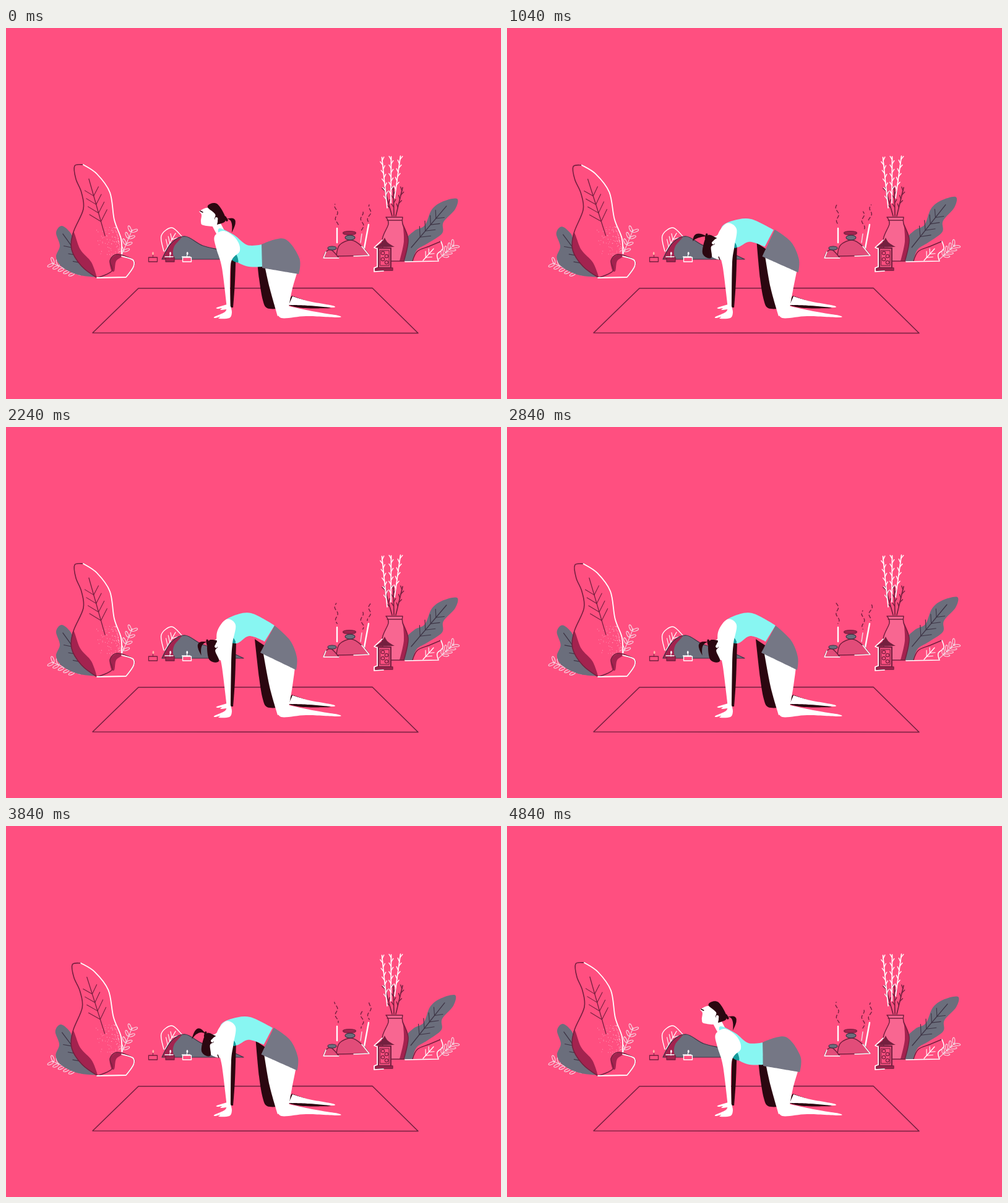
An HTML page with a canvas that plays this animation: 800x600 px, repeating every 4880 ms.

```html
<!DOCTYPE html>
<html lang="en">
<head>
<meta charset="utf-8">
<title>Cat and cow stretch</title>
<style>
html, body { margin: 0; width: 100%; height: 100%; overflow: hidden; background: #ff4f80; }
canvas { display: block; width: 800px; height: 600px; }
</style>
</head>
<body>
<canvas id="stage" width="800" height="600"></canvas>
<script>
const ctx = document.getElementById('stage').getContext('2d');
const LOOP = 4880, TAU = Math.PI * 2, RAD = Math.PI / 180;
const PINK = '#ff4f80', LIGHT = '#f86691', ROSE = '#e24c79', MAROON = '#a3234f', DARK = '#74203f',
  GREY = '#6b6e7c', SHORTS = '#757785', DEEP = '#3d3445', WHITE = '#ffffff', PALE = '#f4d5e0',
  CYAN = '#88f6f2', TEAL = '#159a9b', BLACK = '#2b0710';

const mix = (a, b, k) => a + (b - a) * k;
const clamp = (v, low, high) => Math.max(low, Math.min(high, v));

// Points are written "x,y"; a trailing "!" makes a sharp corner.
const pts = text => text.split(' ').map(word => {
  const [x, y] = word.split(',').map(parseFloat);
  return { x, y, hard: word.endsWith('!') };
});

function spline(source, closed) {
  const p = typeof source === 'string' ? pts(source) : source;
  const n = p.length, path = new Path2D();
  const at = i => closed ? p[(i + n) % n] : p[clamp(i, 0, n - 1)];
  path.moveTo(p[0].x, p[0].y);
  for (let i = 0; i < (closed ? n : n - 1); i++) {
    const a = at(i - 1), b = at(i), c = at(i + 1), d = at(i + 2);
    const u = b.hard ? 0 : 1 / 6, v = c.hard ? 0 : 1 / 6;
    path.bezierCurveTo(b.x + (c.x - a.x) * u, b.y + (c.y - a.y) * u,
      c.x - (d.x - b.x) * v, c.y - (d.y - b.y) * v, c.x, c.y);
  }
  return path;
}

function fill(source, color) {
  ctx.fillStyle = color;
  ctx.fill(spline(source, true));
}

function line(source, color, width = 1.5, closed = false) {
  ctx.strokeStyle = color;
  ctx.lineWidth = width;
  ctx.stroke(spline(source, closed));
}

function stroke(x0, y0, x1, y1, color, width = 1.3) {
  ctx.strokeStyle = color;
  ctx.lineWidth = width;
  ctx.beginPath();
  ctx.moveTo(x0, y0);
  ctx.lineTo(x1, y1);
  ctx.stroke();
}

function oval(x, y, rx, ry, color, edge, angle = 0) {
  ctx.beginPath();
  ctx.ellipse(x, y, rx, ry, angle, 0, TAU);
  if (color) { ctx.fillStyle = color; ctx.fill(); }
  if (edge) { ctx.strokeStyle = edge; ctx.lineWidth = 1.2; ctx.stroke(); }
}

function box(x, y, w, h, color, edge, width = 1.3) {
  ctx.fillStyle = color;
  ctx.fillRect(x, y, w, h);
  ctx.strokeStyle = edge;
  ctx.lineWidth = width;
  ctx.strokeRect(x, y, w, h);
}

function pivot(x, y, angle, paint) {
  ctx.save();
  ctx.translate(x, y);
  ctx.rotate(angle);
  ctx.translate(-x, -y);
  paint();
  ctx.restore();
}

// A rib with side veins that shorten towards the tip.
function veins(x0, y0, x1, y1, pairs, length, color) {
  stroke(x0, y0, x1, y1, color);
  const angle = Math.atan2(y1 - y0, x1 - x0);
  for (let i = 0; i < pairs; i++) {
    const k = .25 + .6 * i / pairs, x = mix(x0, x1, k), y = mix(y0, y1, k);
    for (const side of [-.75, .75]) {
      const reach = length * (1.15 - .5 * k);
      stroke(x, y, x + Math.cos(angle + side) * reach, y + Math.sin(angle + side) * reach, color, 1.1);
    }
  }
}

function sprig(x0, y0, x1, y1, pairs) {
  stroke(x0, y0, x1, y1, PALE, 1.1);
  const angle = Math.atan2(y1 - y0, x1 - x0);
  for (let i = 1; i <= pairs; i++) {
    const k = i / (pairs + .4), x = mix(x0, x1, k), y = mix(y0, y1, k);
    for (const a of [angle - .8, angle + .8]) {
      oval(x + Math.cos(a) * 6, y + Math.sin(a) * 6, 5, 1.9, null, PALE, a);
    }
  }
}

function branch(x0, y0, x1, y1, color) {
  stroke(x0, y0, x1, y1, color, 1.7);
  const angle = Math.atan2(y1 - y0, x1 - x0), twigs = Math.hypot(x1 - x0, y1 - y0) / 7;
  for (let i = 2; i < twigs; i++) {
    const k = i / twigs, a = angle + (i % 2 ? .55 : -.55);
    const x = mix(x0, x1, k), y = mix(y0, y1, k);
    stroke(x, y, x + Math.cos(a) * 6.5, y + Math.sin(a) * 6.5, color, 1.4);
  }
}

let seed = 11;
const random = () => (seed = seed * 16807 % 2147483647) / 2147483647;
const specks = Array.from({ length: 130 }, () => {
  const y = mix(322, 368, random());
  return { x: 177 + (y - 322) * .22 - 34 * random() ** 3, y };
});

function leftPlants(sway) {
  sprig(120, 400, 74, 380, 5);
  sprig(185, 372, 204, 326, 4);
  pivot(147, 403, -.02 * sway, () => {
    fill('81,331 90,320 104,331 113,350 147,403! 116,399 90,386 81,370 87,352', GREY);
    veins(138, 397, 92, 333, 3, 18, DEEP);
  });

  pivot(146, 352, -.032 * sway, () => {
    const leftEdge = '125,221 111,223 113,244 122,266 125,293 109,330 106,358 122,385 147,404!';
    const rightEdge = '125,221 147,236 168,266 175,310 186,341 187,366';
    fill(leftEdge + ' 184,402! ' + rightEdge.split(' ').reverse().join(' '), PINK);
    fill('109,330 106,358 122,385 147,404! 138,379 120,358', MAROON);
    line(leftEdge, DARK, 1.6);
    line(rightEdge, WHITE, 1.8);
    veins(160, 336, 134, 244, 4, 21, DARK);
    ctx.fillStyle = 'rgba(255,255,255,.5)';
    for (const { x, y } of specks) ctx.fillRect(x, y, .9, .9);
  });

  const front = '147,404! 171,393 168,376 180,366 205,375 206,386 194,403!';
  fill(front, PINK);
  fill('170,391 168,376 180,366 188,369 178,377 175,393', MAROON);
  line(front, DARK, 1.4);
  line('147,404! 194,403! 206,386 205,375 187,369', WHITE, 1.8);
}

function stonesAndCandles(t) {
  line('255,361 251,336 268,323 285,338', WHITE, 1.4);
  veins(257, 361, 274, 332, 3, 12, WHITE);
  const mound = '252,374! 268,347 290,337 318,352 354,361 384,374!';
  fill(mound, GREY);
  fill('252,374! 266,349 284,338 272,353 270,366 274,374!', MAROON);
  line(mound, DEEP, 1.2, true);
  for (let i = 0; i < 3; i++) {
    const x = 237.5 + 27.5 * i, edge = i ? WHITE : DARK;
    box(x - 7, 371, 14, 7, i === 1 ? MAROON : PINK, i === 1 ? DARK : edge);
    if (i) stroke(x - 8, 370, x + 5, 370, WHITE);
    stroke(x, 371, x, 367, edge, 1);
    oval(x + Math.sin(TAU * 9 * t / LOOP + i) * .7, 364.5, 1.4, 2.6, i ? WHITE : '#ffb5a8');
  }
}

function smoke(x, top, bottom, lean, t) {
  const points = [];
  for (let y = bottom; y >= top; y -= 3) {
    points.push({ x: x + (bottom - y) * lean + 2.2 * Math.sin(y * .3 + TAU * 4 * t / LOOP), y });
  }
  ctx.setLineDash([5, 4]);
  ctx.lineDashOffset = -54 * t / LOOP;
  line(points, DARK, 1.4);
  ctx.setLineDash([]);
}

function incense(t) {
  smoke(535, 283, 318, -.06, t);
  smoke(576, 295, 327, -.03, t);
  smoke(586, 285, 313, .1, t);
  stroke(535, 324, 535, 347, WHITE, 2.4);
  stroke(586, 318, 579, 356, WHITE, 2.4);
  stroke(575, 333, 573, 347, PALE, 1.5);
  const mound = '534,369! 539,351 558,343 575,353 587,368!';
  fill(mound, ROSE);
  line(mound, DARK, 1.5, true);
  line('562,369! 587,368! 575,353', WHITE);
  oval(556, 339, 8, 3.8, GREY, DEEP);
  oval(555, 331.5, 10.5, 3, MAROON, DARK);
  const pebble = '513,372! 517,362 526,359 538,372!';
  fill(pebble, ROSE);
  line(pebble, DARK);
  line('538,372! 513,372! 517,362', WHITE);
  oval(527, 356, 7, 3, GREY, DEEP);
}

function rightPlants(sway) {
  pivot(648, 377, -.036 * sway, () => {
    fill('644,377! 645,345 660,328 677,319 688,294 705,281 729,276 726,293 707,314 705,332 682,348 664,359 657,377!', GREY);
    veins(655, 355, 712, 288, 4, 17, DEEP);
  });
  fill('657,377! 665,361 684,353 703,345 706,357 697,366 697,377!', PINK);
  line('657,377! 665,361 684,353 703,345', DARK);
  line('703,345 706,357 697,366 699,377! 645,378', WHITE);
  veins(674, 376, 691, 357, 2, 10, WHITE);
  sprig(699, 374, 724, 351, 4);
}

function vase() {
  for (let i = -1; i <= 1; i++) {
    branch(627 + 3 * i, 304, 626 + 15 * i, 258, DARK);
    branch(622 + 6 * i, 283 - 8 * i, 622.5 + 15 * i, 208 - i, WHITE);
  }
  const body = '614,306! 641,306! 641,317 650,342 643,377! 614,377! 608,343 618,317';
  fill(body, LIGHT);
  fill('641,315! 650,342 643,377! 636,377! 643,345', MAROON);
  line(body, DARK, 1.5, true);
  stroke(616, 311, 640, 311, DARK);
}

function lantern() {
  box(602, 356, 20, 32, ROSE, DARK, 2);
  box(605, 360, 14, 24, PINK, DARK, 1);
  for (let i = 0; i < 4; i++) oval(612 + (i % 2 ? 3 : -3), 364 + 5 * i, 2.7, 2.7, null, DARK);
  fill('612,339! 617,347 628,354! 596,355! 607,347', DARK);
  box(597, 388, 28, 4, MAROON, DARK);
  line('608,343 595,355! 600,357! 600,386! 595,388! 595,394! 610,393', WHITE, 1.7);
}

// Blends the arched and rounded pose, displaced half-way by dx, dy.
function blend(arched, rounded, k, dx = 0, dy = 0) {
  const end = pts(rounded), half = 4 * k * (1 - k);
  return pts(arched).map((p, i) => ({
    x: mix(p.x, end[i].x, k) + dx * half,
    y: mix(p.y, end[i].y, k) + dy * half,
    hard: p.hard
  }));
}

function ponytail(x, y, k, direction) {
  const swing = Math.sin(Math.PI * k);
  const aim = (66 - 310 * k + 22 * swing) * RAD;
  const bend = aim + (-80 + 150 * k + 50 * swing * direction) * RAD;
  const tip = { x: x + 24 * Math.cos(aim), y: y + 24 * Math.sin(aim) };
  const mid = { x: x + 20 * Math.cos(bend), y: y + 20 * Math.sin(bend) };
  const nx = -Math.sin(aim) * 7, ny = Math.cos(aim) * 7;
  ctx.fillStyle = BLACK;
  ctx.beginPath();
  ctx.moveTo(x, y);
  ctx.quadraticCurveTo(mid.x + nx, mid.y + ny, tip.x, tip.y);
  ctx.quadraticCurveTo(mid.x - nx, mid.y - ny, x, y);
  ctx.fill();
}

function head(k, direction) {
  const [skull] = blend('335,306', '343,359', k, -16);
  const angle = -155 * k * RAD, cos = Math.cos(angle), sin = Math.sin(angle);
  const place = (x, y) => [skull.x + x * cos - y * sin, skull.y + x * sin + y * cos];
  stroke(...place(3, 8), mix(348, 353, k), mix(333, 334, k), WHITE, 14);
  ponytail(...place(20, 3), k, direction);
  ctx.save();
  ctx.translate(skull.x, skull.y);
  ctx.rotate(angle);
  fill('-8,-15 -23,-9! -19,-4 -20,7 -16,13 8,14 12,0', WHITE);
  fill('-9,-16 -4,-22 7,-21 18,-4 19,7 6,12! 7,5 2,3 3,-5', BLACK);
  oval(5, 3, 2.4, 3, WHITE);
  stroke(-21, -10, -17, -8, BLACK, 1.5);
  stroke(19, 0, 22, 5, BLACK, 3.5);
  ctx.restore();
}

function woman(t) {
  const apart = Math.abs(t - LOOP / 2);
  const k = .5 + .5 * Math.cos(Math.PI * clamp((apart - 1100) / 1340, 0, 1));
  const shirt = blend('345,324 369,335 390,351 414,350! 414,386! 388,385 365,371 346,340',
    '349,318 366,306 396,301 434,321! 418,347! 393,338 371,350 352,330', k, -2, 5);
  const shorts = blend('414,388! 413,350! 450,341 474,372 473,398!',
    '411,365! 434,321! 459,345 470,372 469,393!', k, 3, 4);
  const arm = blend('337,337 340,357 349,388 357,453! 363,453! 363,382 378,360 371,340 352,328',
    '341,332 343,360 349,388 357,453! 363,453! 364,382 366,350 371,320 356,311', k, 0, 0);
  for (const p of arm) if (p.y < 375) p.y += 24 * k * (1 - k);
  const hip = shorts[0], seat = shorts[4];

  fill('462,433! 452,447! 480,453 526,453! 500,446', BLACK);
  fill('463,434! 490,442 528,449 527,452 490,449 457,448!', WHITE);
  fill([{ x: hip.x - 9, y: hip.y - 22, hard: true },
    ...pts('409,405 415,440 422,453 440,454! 440,430'),
    { x: hip.x + 12, y: hip.y - 8, hard: true }], BLACK);
  fill('361,446! 341,452 342,454 349,453 347,456 364,454!', WHITE);
  head(k, t < LOOP / 2 ? -1 : 1);
  fill('364,348! 362,452! 367,452! 370,410 372,348!', BLACK);
  fill([{ x: hip.x + 4, y: hip.y - 4, hard: true },
    ...pts('426,420 439,466! 456,458! 462,425'),
    { x: seat.x - 2, y: seat.y - 4, hard: true }], WHITE);
  fill('439,455! 454,449! 485,456 518,462 537,465 537,468 485,466 445,469', WHITE);
  fill(shirt, CYAN);
  fill(blend('361,360 372,366 375,379 364,374', '365,340 369,343 371,349 366,349', k, 0, 6), TEAL);
  fill(shorts, SHORTS);
  fill(arm, WHITE);
  fill('357,450! 354,459 337,467 338,469 346,467 344,470 361,469 365,460 363,450!', WHITE);
}

function frame(now) {
  const t = Math.floor(now % LOOP / 40) * 40;
  const sway = .5 + .5 * Math.tanh(2 * Math.cos(TAU * (t - 1080) / (LOOP / 2)));
  ctx.fillStyle = PINK;
  ctx.fillRect(0, 0, 800, 600);
  line('214,421! 592,420.5! 666,493.5! 140,493!', DARK, 1.6, true);
  leftPlants(sway);
  stonesAndCandles(t);
  incense(t);
  rightPlants(sway);
  vase();
  lantern();
  woman(t);
}

ctx.lineCap = ctx.lineJoin = 'round';
const start = performance.now();
function tick() {
  frame(performance.now() - start);
  requestAnimationFrame(tick);
}
tick();
</script>
</body>
</html>
```
